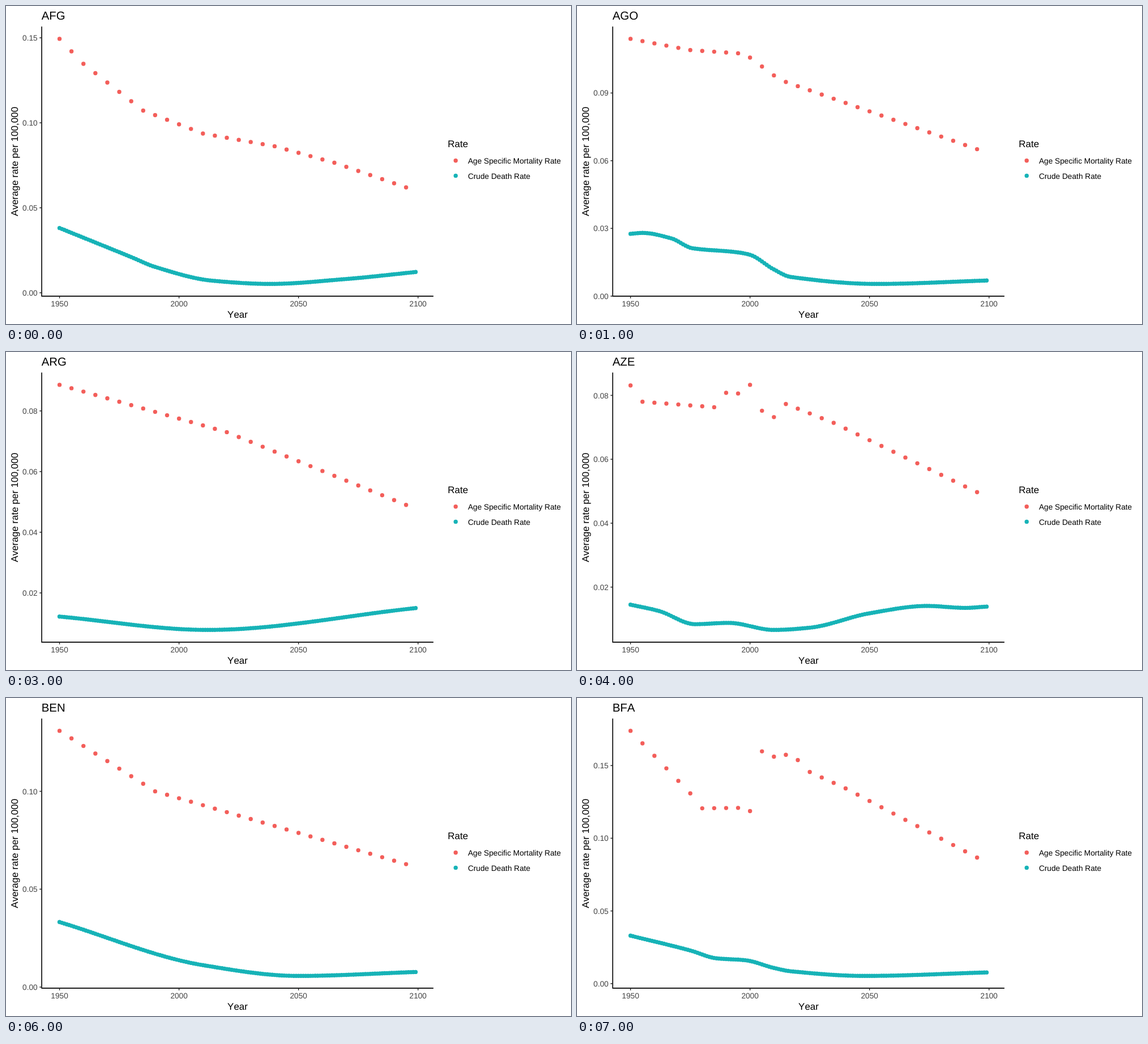
Recreate the animation shown at these times as an HTML page. Size 998x561 px, loop 8000 ms.

```html
<!DOCTYPE html>
<html lang="en">
<head>
<meta charset="utf-8">
<title>Mortality rates by country</title>
<style>
  html, body { margin: 0; width: 100%; height: 100%; overflow: hidden; background: #fff; }
  svg { display: block; font-family: "Liberation Sans", Arial, sans-serif; font-kerning: none; text-rendering: geometricPrecision; }
  .title { font-size: 20.4px; }
  .name { font-size: 17px; }
  .label { font-size: 13.7px; }
  .grey { fill: #444; }
  .mid { text-anchor: middle; }
  .end { text-anchor: end; }
  .axis { stroke: #000; stroke-width: 1.6; fill: none; }
  .tick { stroke: #333; stroke-width: 1.6; }
  .asmr { fill: #f35e5a; }
  .cdr { fill: #17b3b7; }
</style>
</head>
<body>
<svg id="stage" width="998" height="561" viewBox="0 0 998 561"></svg>
<script>
const HOLD = 1000, RIGHT = 755, TOP = 36.3, BOTTOM = 511.9, DOT = 3.7;

// Key points are pairs: years since 1950, rate per thousand.
const charts = [
  { code: 'AFG', step: 50,
    asmr: [0,149.4, 10,134.7, 35,107.2, 60,93.7, 90,86.2, 115,76.5, 145,62],
    cdr: [0,38.1, 30,21, 40,15.2, 64,7.1, 88,5.2, 120,8.1, 149,12.2] },
  { code: 'AGO', step: 30,
    asmr: [0,114, 25,109, 45,107.6, 50,105.7, 60,97.8, 65,94.9, 145,65.1],
    cdr: [0,27.6, 5,28, 17,25.6, 26,21.2, 44,19.5, 50,18.3, 60,11.8, 67,8.5, 103,5.4, 149,6.9] },
  { code: 'ALB', step: 25,
    asmr: [0,83.3, 10,72.6, 20,85.2, 35,83.7, 40,88.4, 45,86.1, 50,77.6, 55,76.7, 60,78.8, 65,74.1, 110,52, 145,38.8],
    cdr: [0,17.1, 14,9.5, 37,5.8, 52,5.9, 80,9.8, 100,13.7, 114,14.4, 130,19.7, 140,21.7, 149,21.4] },
  { code: 'ARG', step: 20,
    asmr: [0,88.6, 70,73, 145,49],
    cdr: [0,12.2, 62,7.8, 149,15] },
  { code: 'AZE', step: 20,
    asmr: [0,83.1, 5,78, 35,76.3, 40,80.8, 45,80.6, 50,83.3, 55,75.2, 60,73.2, 65,77.3, 85,71.4, 145,49.7],
    cdr: [0,14.5, 12,12.5, 27,8.4, 41,8.8, 60,6.6, 75,7.3, 100,11.8, 124,14.1, 140,13.5, 149,13.9] },
  { code: 'BDI', step: 25,
    asmr: [0,119.2, 15,108.7, 35,107.8, 45,109, 50,104.2, 55,92.1, 60,89.2, 100,77, 145,59.1],
    cdr: [0,26, 24,20.3, 38,17.4, 45,17.3, 62,9.6, 72,7.6, 100,5.5, 149,7.6] },
  { code: 'BEN', step: 50,
    asmr: [0,130.9, 40,100, 145,62.8],
    cdr: [0,33.2, 60,11.2, 100,5.7, 149,7.7] },
  { code: 'BFA', step: 50,
    asmr: [0,173.9, 25,130.9, 30,120.6, 45,120.9, 50,118.7, 55,159.8, 60,156.1, 65,157.4, 70,153.8, 75,145.6, 90,134.3, 145,86.7],
    cdr: [0,33, 25,22.8, 36,17.4, 48,16.1, 60,10.8, 67,8.5, 98,5.3, 149,7.7] }
];

const stage = document.getElementById('stage');

function add(parent, tag, attrs, content) {
  const el = document.createElementNS('http://www.w3.org/2000/svg', tag);
  for (const key in attrs) el.setAttribute(key, attrs[key]);
  if (content !== undefined) el.textContent = content;
  return parent.appendChild(el);
}
const text = (parent, x, y, cls, content) => add(parent, 'text', { x, y, class: cls }, content);
const dot = (parent, cx, cy, cls) => add(parent, 'circle', { cx, cy, r: DOT, class: cls });
const tick = (parent, d) => add(parent, 'path', { d, class: 'tick' });

// Interpolates key points: straight, or as a curve without overshoot.
function follow(keys, smooth) {
  const last = keys.length / 2 - 1, x = i => keys[2 * i], y = i => keys[2 * i + 1];
  const grade = i => (y(i + 1) - y(i)) / (x(i + 1) - x(i));
  const slope = i => {
    const a = grade(Math.max(i - 1, 0)), b = grade(Math.min(i, last - 1));
    return a * b > 0 ? 2 * a * b / (a + b) : 0;
  };
  return at => {
    let i = 0;
    while (i < last - 1 && at > x(i + 1)) i++;
    const w = x(i + 1) - x(i), u = (at - x(i)) / w, v = 1 - u, g = grade(i);
    const bend = smooth ? w * u * v * ((slope(i) - g) * v - (slope(i + 1) - g) * u) : 0;
    return y(i) + g * w * u + bend;
  };
}

function drawChart({ code, step, asmr, cdr }) {
  const g = add(stage, 'g', { visibility: 'hidden' });
  const digits = step % 10 ? 3 : 2;
  const left = digits === 3 ? 70.7 : 63.1;

  // The panel pads the data by 5% on each side.
  const rate = follow(asmr, false), crude = follow(cdr, true);
  const years = Array.from({ length: 150 }, (_, i) => i);
  const fives = years.filter(year => year % 5 === 0);
  const low = Math.min(...years.map(crude)), high = Math.max(...fives.map(rate));
  const pad = (high - low) * .05, min = low - pad, max = high + pad;
  const yOf = value => BOTTOM - (value - min) / (max - min) * (BOTTOM - TOP);
  const perYear = (RIGHT - left) / 163.9;
  const xOf = year => left + (year + 7.45) * perYear;

  fives.forEach(year => dot(g, xOf(year), yOf(rate(year)), 'asmr'));
  years.forEach(year => dot(g, xOf(year), yOf(crude(year)), 'cdr'));

  add(g, 'path', { d: `M${left} ${TOP}V${BOTTOM}M${left - .8} ${BOTTOM}H${RIGHT}`, class: 'axis' });
  for (let value = Math.ceil(min / step) * step; value <= max; value += step) {
    const y = yOf(value);
    tick(g, `M${left - 3.8} ${y}H${left}`);
    text(g, left - 7.4, y + 5, 'label grey end', (Math.abs(value) / 1000).toFixed(digits));
  }
  for (let year = 0; year <= 150; year += 50) {
    tick(g, `M${xOf(year)} ${BOTTOM}v3.8`);
    text(g, xOf(year), 530, 'label grey mid', 1950 + year);
  }
  text(g, left - .4, 23.6, 'title', code);
  text(g, (left + RIGHT) / 2, 549.5, 'name mid', 'Year');
  return g;
}

const views = charts.map(drawChart);

add(stage, 'text', { transform: 'translate(20.6 274.3) rotate(-90)', class: 'name mid' }, 'Average rate per 100,000');
text(stage, 780.3, 249.4, 'name', 'Rate');
[['asmr', 'Age Specific Mortality Rate'], ['cdr', 'Crude Death Rate']].forEach(([cls, name], i) => {
  dot(stage, 794.3, 272.8 + i * 26.6, cls);
  text(stage, 815.9, 278 + i * 26.6, 'label', name);
});

let shown = -1;
function show(now) {
  const next = Math.floor(now / HOLD) % views.length;
  if (next === shown) return;
  views.forEach((view, i) => view.setAttribute('visibility', i === next ? 'visible' : 'hidden'));
  shown = next;
}
const begin = performance.now();
function frame() {
  show(performance.now() - begin);
  requestAnimationFrame(frame);
}
frame();
</script>
</body>
</html>
```
